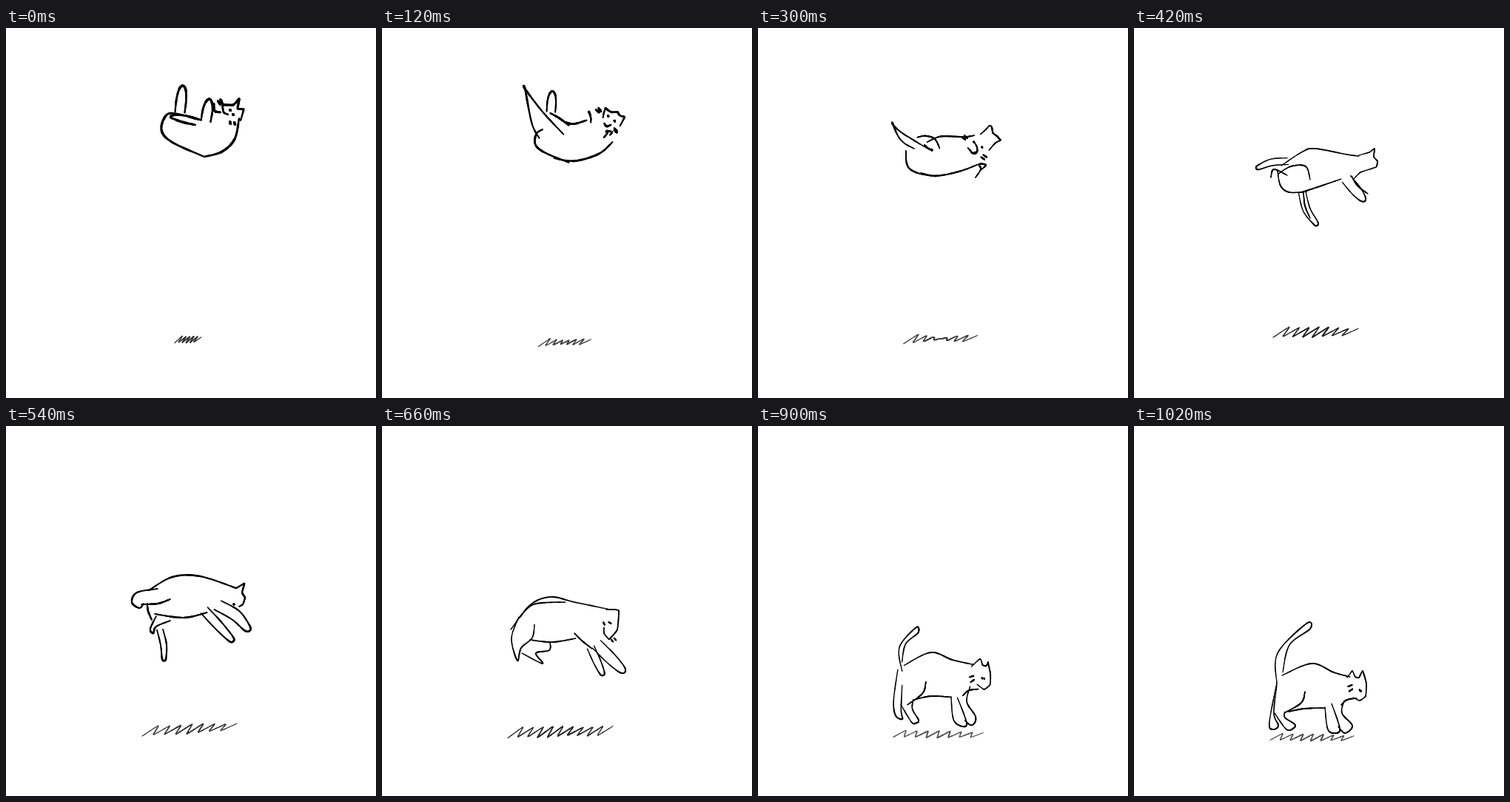
Recreate the animation shown at these times as an HTML page with a canvas. Size 500 by 500 pixels, loop 1080 ms.

```html
<!DOCTYPE html>
<html lang="en">
<head>
<meta charset="utf-8">
<title>Falling cat</title>
<style>
html, body { margin: 0; height: 100%; overflow: hidden; background: #fff; }
canvas { display: block; }
</style>
</head>
<body>
<canvas id="stage" width="500" height="500"></canvas>
<script>
const ctx = document.getElementById('stage').getContext('2d');
const STEP = 60, FRAMES = 18, N = 64;
const mix = (a, b, k) => a + (b - a) * k;
const wobble = j => Math.sin(j * .37) + Math.sin(j * .91 + 2);

// A curve through a few key points
const curve = text => text.split(' ').map(Number);

// Short straight mark around (x, y)
function tick(x, y, degrees, length = 6) {
  const a = degrees * Math.PI / 180, dx = Math.cos(a) * length / 2, dy = Math.sin(a) * length / 2;
  return [x - dx, y - dy, x + dx, y + dy];
}
const dot = (x, y) => tick(x, y, 60, 1.5);

// Rounded, tapering leg or tail from base to tip, bent sideways in the middle
function limb(x0, y0, x1, y1, width, bend = 0) {
  const len = Math.hypot(x1 - x0, y1 - y0), ux = (x1 - x0) / len, uy = (y1 - y0) / len;
  const at = (along, side) => [x0 + ux * along - uy * side, y0 + uy * along + ux * side];
  const h = width / 2;
  return [at(0, h), at(len / 2, bend + h), at(len - h * .7, h * .65), at(len, 0),
    at(len - h * .7, -h * .65), at(len / 2, bend - h), at(0, -h)].flat();
}

// Slanted shading, its teeth shrinking to the right
function scribble(x0, y0, x1, y1, height, teeth, lean) {
  const pts = [];
  for (let i = 0; i <= teeth; i++) {
    const k = i / teeth, x = mix(x0, x1 - lean, k), y = mix(y0, y1, k);
    const h = height * (1 - .25 * k + .12 * Math.sin(i * 5)) / 2;
    pts.push(x, y + h, x + lean, y - h);
  }
  return pts;
}

// Key poses: at = step, w = pen width, ease = exponent on the way in.
// Strokes with the same name turn into each other.
const poses = [
  { at: 0, w: 2.9, ease: 1, gray: 50, parts: {
    hind: limb(235, 114, 239, 78, 13),
    rump: curve('243 119 219 116 210 137 224 154 268 174'),
    bottom: curve('268 174 292 167 309 150 315 122'),
    knee: curve('222 119 230 117 240 118'),
    thigh: curve('222 121 238 127 256 131'),
    top: curve('241 118 252 121 262 124'),
    fore: limb(270, 126, 275, 96, 13),
    paw: curve('281 102 282 112 290 114'),
    head: curve('300 117 294 114 293 104 307 104 315 96 313 109 321 110 317 125'),
    eye: dot(303, 111), eye2: dot(307, 117),
    mark: tick(303, 128, 75, 4), mark2: tick(309, 129, 65, 4),
    fur: tick(288, 101, 55), fur2: tick(291, 99, 65)
  }, ground: scribble(228, 421, 264, 421, 9, 5, 10) },
  { at: 3, w: 2.3, ease: 1, gray: 70, parts: {
    tail: curve('214 154 204 134 195 88 195 88 219 119 247 149'),
    hind: limb(225, 113, 226, 89, 11),
    rump: curve('204 146 207 170 245 186'),
    bottom: curve('215 177 245 186 285 180 310 170'),
    thigh: curve('230 112 240 119 251 132'),
    top: curve('250 131 262 134 284 125'),
    fore: curve('285 128 282 122 292 121'),
    head: curve('298 123 306 108 312 118 321 123 332 125 324 136'),
    eye: dot(307, 123), eye2: dot(318, 130),
    mouth: curve('302 134 305 138 311 136'),
    mark: tick(322, 142, 35), mark2: tick(319, 145, 35),
    fur: tick(293, 118, 35), fur2: tick(296, 116, 45),
    paw: curve('309 171 316 160 314 153 323 154 317 160')
  }, ground: scribble(203, 427, 292, 426, 12, 6, 19) },
  { at: 7, w: 1.6, ease: 1.25, gray: 25, parts: {
    tail: limb(208, 180, 165, 189, 9, 3),
    top: curve('199 186 228 167 245 163 288 171 304 173'),
    head: curve('304 172 318 168 325 163 324 174 329 180 327 188 306 195 296 205'),
    thigh: curve('195 197 212 187 232 187 238 205'),
    knee: curve('185 202 189 191 207 199'),
    rump: curve('194 193 198 213 210 222 234 221'),
    bottom: curve('226 222 245 216 280 204'),
    fore: limb(287, 204, 312, 234, 14),
    fore2: curve('294 200 302 213 316 224'),
    hind: limb(227, 221, 247, 267, 10, 4),
    shin: curve('229 222 231 240 238 257')
  }, ground: scribble(188, 411, 303, 411, 14, 7, 22) },
  { at: 9, w: 2.2, ease: 1, gray: 50, parts: {
    tail: curve('205 220 177 225 170 238 180 246 186 240'),
    tail2: curve('183 241 205 240 222 234'),
    top: curve('193 222 225 204 262 203 311 219'),
    head: curve('303 216 311 219 322 213 319 225 323 232 320 241 315 244'),
    eye: dot(308, 241),
    fore2: limb(286, 242, 330, 276, 15, -4),
    fore: limb(268, 249, 307, 291, 12),
    bottom: curve('201 254 240 259 272 252'),
    rump: curve('191 240 192 250 197 262'),
    foot: curve('222 263 203 271 199 280 195 274 203 257'),
    hind: limb(208, 275, 214, 317, 8, -2)
  }, ground: scribble(184, 412, 312, 407, 14, 7, 22) },
  { at: 11, w: 1.7, ease: 1, gray: 30, parts: {
    top: curve('174 275 200 242 228 231 260 238 308 248'),
    tail2: curve('186 259 205 241 248 238'),
    head: curve('303 248 313 248 320 250 318 275 307 288 300 280 300 272'),
    eye: tick(300, 267, 65, 4), eye2: tick(308, 266, 35, 4),
    mark: tick(311, 290, 50, 4), mark2: tick(315, 288, 50, 4),
    rump: curve('185 258 175 287 183 317 188 300 203 286 206 268'),
    foot: curve('189 307 217 321 208 307 226 303 227 292'),
    bottom: curve('200 289 230 292 262 287'),
    shoulder: curve('260 280 270 290 284 301'),
    fore2: limb(290, 295, 328, 333, 15),
    fore: limb(282, 299, 299, 337, 10)
  }, ground: scribble(170, 414, 312, 412, 15, 9, 21) },
  { at: 13, w: 1.7, ease: 1, gray: 85, parts: {
    tail: curve('199 291 180 279 163 289 173 291 179 286'),
    rump: curve('179 286 184 300 183 345 195 374 204 373 199 350'),
    top: curve('191 291 217 270 245 275 288 282'),
    head: curve('290 289 313 275 313 284 319 288 313 293 315 312 306 320 296 306'),
    eye: dot(298, 302), eye2: dot(304, 301),
    thigh: curve('217 313 214 330 199 350'),
    foot: curve('200 348 210 375 206 386 217 384 220 355 224 328'),
    bottom: curve('227 328 245 324 267 331'),
    fore: curve('268 331 270 366 288 385 290 379 275 347'),
    fore2: curve('293 306 284 343 298 376 288 378')
  }, ground: scribble(180, 406, 322, 407, 9, 7, 17) },
  { at: 17, w: 1.7, ease: .5, gray: 75, parts: {
    tail: curve('193 348 194 307 233 267 238 274 210 296 201 333'),
    top: curve('200 337 240 321 270 333 292 339'),
    head: curve('288 340 295 331 299 339 304 340 309 331 314 348 313 365 305 371 296 367'),
    eye: dot(305, 357), eye2: dot(306.5, 358),
    mark: tick(292, 351, -20), mark2: tick(293, 357, -35),
    rump: curve('193 347 183 400 187 410 195 405 189 388 193 350'),
    thigh: curve('231 359 226 374 203 388'),
    foot: curve('190 388 206 410 216 408 217 403 204 394 204 386'),
    bottom: curve('209 386 230 382 258 381'),
    fore: curve('258 380 262 410 273 415 278 408 267 375'),
    fore2: curve('284 371 281 388 295 405 285 415 276 406'),
    shoulder: curve('301 368 288 370 280 377')
  }, ground: scribble(184, 420, 297, 422, 9, 7, 17) }
];

// Spline with N + 1 samples; a low tension keeps corners sharp
function sample(v, tension) {
  const last = v.length / 2 - 1;
  const at = (i, c) => v[2 * Math.max(0, Math.min(last, i)) + c];
  return Array.from({ length: N + 1 }, (_, j) => {
    const u = j / N * last, i = Math.min(last - 1, Math.floor(u)), t = u - i;
    const s = t * t * (3 - 2 * t);
    return [0, 1].map(c => {
      const p = at(i, c), q = at(i + 1, c);
      const leave = tension * (q - at(i - 1, c)), arrive = tension * (at(i + 2, c) - p);
      return mix(p, q, s) + t * (1 - t) * ((1 - t) * leave - t * arrive);
    });
  });
}

for (const pose of poses) {
  pose.lines = {};
  for (const name in pose.parts) pose.lines[name] = sample(pose.parts[name], name === 'head' ? .2 : .5);
  pose.shade = sample(pose.ground, .2);
  const body = Object.values(pose.lines).flat();
  pose.center = [0, 1].map(c => body.reduce((sum, p) => sum + p[c], 0) / body.length);
}

const morph = (p, q, k) => p.map((s, j) => s.map((x, c) => mix(x, q[j][c], k)));

// Brush stroke: thin at the ends, slightly uneven between
function drawLine(line, width, color) {
  ctx.strokeStyle = color;
  for (let j = 0; j < N; j++) {
    ctx.lineWidth = width * (.7 + .4 * Math.sin(Math.PI * j / N) + .08 * wobble(j));
    ctx.beginPath();
    ctx.moveTo(...line[j]);
    ctx.lineTo(...line[j + 1]);
    ctx.stroke();
  }
}

function drawFrame(frame) {
  const next = Math.max(1, poses.findIndex(p => p.at >= frame));
  const a = poses[next - 1], b = poses[next];
  const k = ((frame - a.at) / (b.at - a.at)) ** b.ease;
  const near = k < .5 ? a : b;
  const width = mix(a.w, b.w, k), gray = mix(a.gray, b.gray, k);
  const shift = [0, 1].map(c => mix(a.center[c], b.center[c], k) - near.center[c]);

  ctx.clearRect(0, 0, 500, 500);
  ctx.lineCap = 'round';
  drawLine(morph(a.shade, b.shade, k), 1.6, `rgb(${gray},${gray},${gray})`);
  for (const name of new Set([...Object.keys(a.lines), ...Object.keys(b.lines)])) {
    const p = a.lines[name], q = b.lines[name], own = near.lines[name];
    if (p && q) drawLine(morph(p, q, k), width, '#000');
    else if (own) drawLine(own.map(s => s.map((x, c) => x + shift[c])), width, '#000');
  }
}

const start = performance.now();
let shown = -1;
function tock() {
  const frame = Math.floor((performance.now() - start) / STEP) % FRAMES;
  if (frame !== shown) drawFrame(shown = frame);
  requestAnimationFrame(tock);
}
tock();
</script>
</body>
</html>
```
